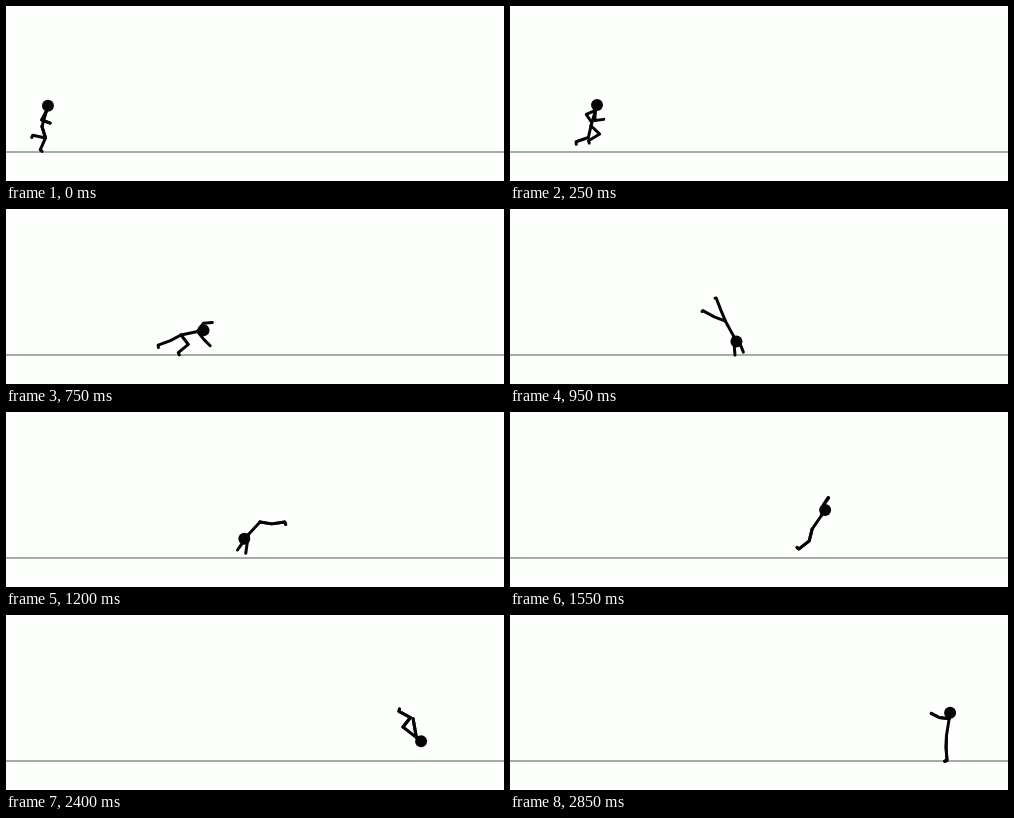
Animation, 498 px wide and 175 px high, one loop 2.9 s. Source, as an HTML page with a canvas:

```html
<!DOCTYPE html>
<html lang="en">
<head>
<meta charset="utf-8">
<title>Tumbling run</title>
<style>
  html, body { margin: 0; width: 100%; height: 100%; overflow: hidden; background: #fdfffc; }
  canvas { display: block; }
</style>
</head>
<body>
<canvas id="stage" width="498" height="175"></canvas>
<script>
const ctx = document.getElementById('stage').getContext('2d');
const LOOP = 2900, STEP = 50, STRIDE = 400;
const TORSO = 17, HEAD = 23, ARM = [10, 9], LEG = [12, 13], FOOT = 2.5;
const keys = [];

// Directions are in degrees: 0 is down, 90 is right, and they wind down as the body turns.
// A limb is its upper direction and its bend; the far limb follows the near one unless given.
function key(time, { hip, lean, arm, leg, arm2 = arm, leg2 = leg, size = 1 }) {
  const limbs = [arm, arm2, leg, leg2].flatMap(([upper, bend = 0]) => [upper, upper + bend]);
  keys.push({ time, pose: [...hip, lean, size, ...limbs] });
}

// Run: limbs swing in opposite phase
for (let time = 0; time < STRIDE; time += STRIDE / 4) {
  const phase = 2 * Math.PI * time / STRIDE, s = Math.sin(phase), c = Math.cos(phase);
  const arm = side => [-28 + 50 * side * s, 98];
  const leg = side => [17 - 43 * side * s, -80 + 39 * side * c];
  key(time, {
    hip: [36 + 0.18 * time, 120.5 - 2 * Math.abs(s)], lean: 164, size: 0.94,
    arm: arm(1), arm2: arm(-1), leg: leg(1), leg2: leg(-1)
  });
}

// Hurdle, round-off, landing
key(450, { hip: [116.5, 115], lean: 167, arm: [115, 43], leg: [-30, -3], leg2: [75, -93] });
key(750, { hip: [175, 126], lean: 102, arm: [38, 7], arm2: [145, -50], leg: [-62, -8], leg2: [38, -89] });
key(975, { hip: [220, 111], lean: 20, arm: [0], arm2: [30, -15], leg: [-170], leg2: [-130] });
key(1200, { hip: [254, 110], lean: -43, arm: [-35], arm2: [-8], leg: [-279, 17] });
key(1450, { hip: [288, 120], lean: -162, arm: [-115, -20], leg: [-350, -22] });
// Back handspring, landing
key(1700, { hip: [323, 111], lean: -290, arm: [-305, -25], leg: [-425, -45] });
key(1950, { hip: [354, 113.5], lean: -385, arm: [-385], leg: [-621, 45], size: 0.82 });
key(2200, { hip: [386, 120], lean: -540, arm: [-515], leg: [-712, -16] });
// Tucked flip, stand
key(2400, { hip: [397, 112], lean: -668, arm: [-530], leg: [-938, 100] });
key(2600, { hip: [430, 112], lean: -810, arm: [-660], leg: [-1060] });
key(2850, { hip: [436.5, 120.5], lean: -909, arm: [-817, -20], leg: [-1082, 6] });

// Cubic interpolation with slopes taken from the neighbouring keys
function poseAt(time) {
  const next = keys.findIndex(k => k.time > time);
  if (next < 0) return keys[keys.length - 1].pose;
  const slope = (i, n) => {
    const a = keys[Math.max(i - 1, 0)], b = keys[Math.min(i + 1, keys.length - 1)];
    return (b.pose[n] - a.pose[n]) / (b.time - a.time);
  };
  const a = keys[next - 1], b = keys[next], span = b.time - a.time;
  const u = (time - a.time) / span, v = 1 - u;
  return a.pose.map((from, n) =>
    from * v * v * (1 + 2 * u) + b.pose[n] * u * u * (3 - 2 * u) +
    span * u * v * (v * slope(next - 1, n) - u * slope(next, n)));
}

function reach([x, y], angle, length) {
  const r = angle * Math.PI / 180;
  return [x + Math.sin(r) * length, y + Math.cos(r) * length];
}

function stroke(...points) {
  ctx.beginPath();
  points.forEach(p => ctx.lineTo(...p));
  ctx.stroke();
}

function limb(root, upper, lower, [long, short], foot = 0) {
  const joint = reach(root, upper, long), end = reach(joint, lower, short);
  stroke(root, joint, end, reach(end, lower + 75 * Math.sign(foot), Math.abs(foot)));
}

function draw(time) {
  const [x, y, lean, size, ...a] = poseAt(time);
  const hip = [x, y], neck = reach(hip, lean, TORSO * size);
  // The body turns round while upside down, so the toes change side.
  const foot = FOOT * Math.max(-1, Math.min(1, (1000 - time) / 100));

  ctx.fillStyle = '#fdfffc';
  ctx.fillRect(0, 0, 498, 175);
  ctx.fillStyle = '#a9aba8';
  ctx.fillRect(0, 145, 498, 2);

  ctx.strokeStyle = ctx.fillStyle = '#050505';
  ctx.lineWidth = 3;
  ctx.lineCap = ctx.lineJoin = 'round';
  stroke(hip, neck);
  limb(neck, a[0], a[1], ARM);
  limb(neck, a[2], a[3], ARM);
  limb(hip, a[4], a[5], LEG, foot);
  limb(hip, a[6], a[7], LEG, foot);
  ctx.beginPath();
  ctx.arc(...reach(hip, lean, HEAD * size), 6, 0, 2 * Math.PI);
  ctx.fill();
}

const start = performance.now();
function tick() {
  const time = (performance.now() - start) % LOOP;
  draw(Math.floor(time / STEP) * STEP);
  requestAnimationFrame(tick);
}
tick();
</script>
</body>
</html>
```
